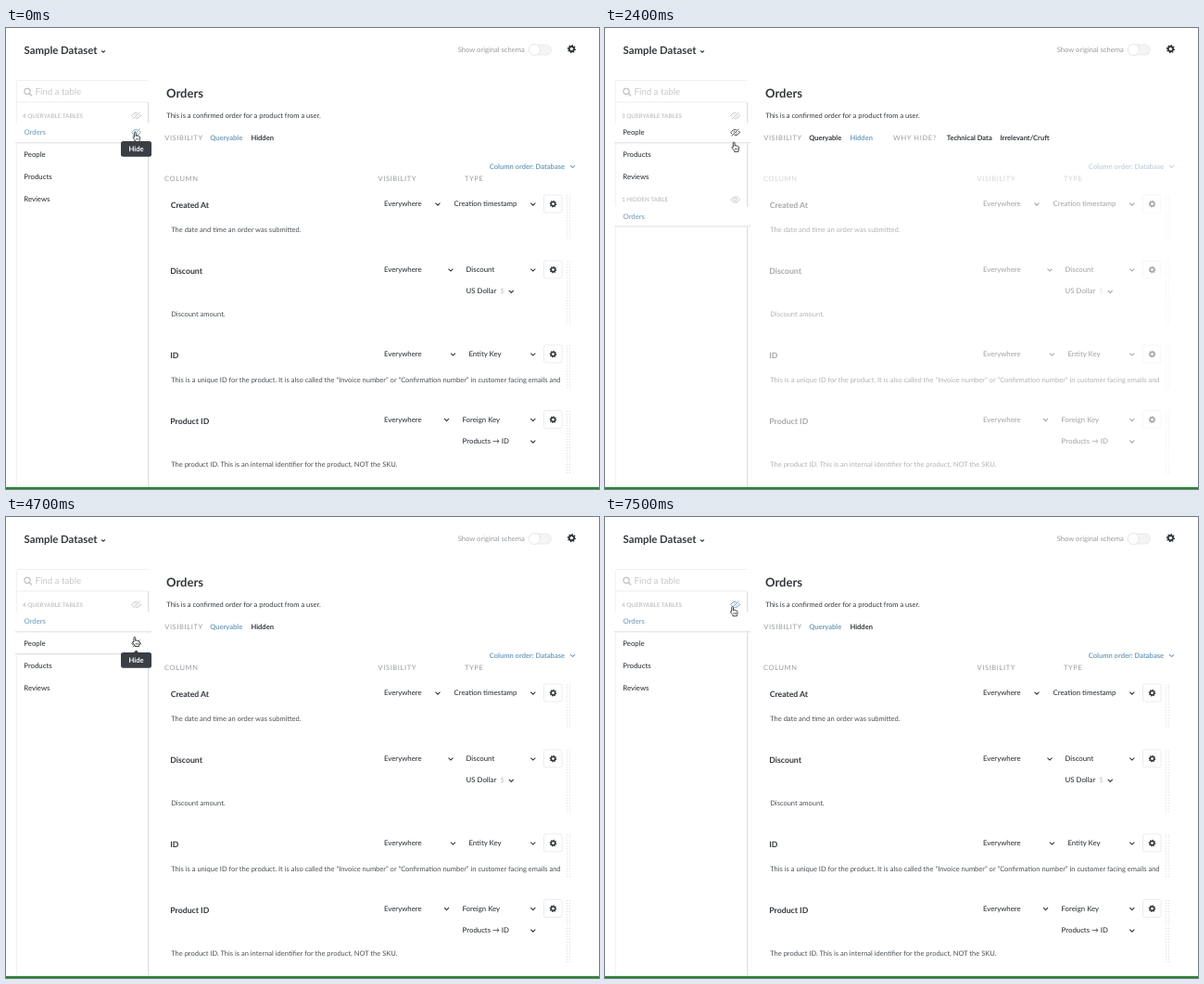
Recreate the animation shown at these times as an HTML page. Size 640 by 497 pixels, loop 8 s.

```html
<!DOCTYPE html>
<html lang="en">
<head>
<meta charset="utf-8">
<title>Table visibility</title>
<style>
html, body { margin: 0; width: 100%; height: 100%; overflow: hidden; background: #fff; }
svg { display: block; width: 640px; height: 497px; }
text { font-family: Lato, "Open Sans", sans-serif; text-rendering: geometricPrecision; white-space: pre; }
</style>
</head>
<body>
<svg id="stage" viewBox="0 0 640 497" xmlns="http://www.w3.org/2000/svg">
  <g id="base"></g>
  <g id="visibility"></g>
  <g id="columns"></g>
  <g id="sidebar"></g>
  <g id="tip"></g>
  <g id="hand"><path fill="#fff" stroke="#2b2f33" stroke-width=".9" stroke-linejoin="round"
    d="M-1.1 5.4V.9a.9.9 0 0 1 1.8 0V4q.2-.7.9-.6.8.1.8.8.3-.5.9-.3.7.1.7.9.4-.3.8 0 .4.2.4.8v1.6q0 1-.6 1.8v1.2H.2v-1q-1.4-1.4-2.4-3.1-.4-.9.2-1.1.5-.1.9.4z"/>
    <path stroke="#2b2f33" stroke-width=".6" d="M1.2 6.3v2M2.4 6.3v2M3.6 6.3v2"/></g>
</svg>
<script>
const LOOP = 8000, STEP = 100;
const INK = '#33383d', TEXT = '#4a4f54', GREY = '#979b9f', PALE = '#c3c5c7', BLUE = '#6f9fc2', DARK = '#3a3f45';
const $ = id => document.getElementById(id);

const label = (x, y, s, size, fill, weight = 400, extra = '') =>
  `<text x="${x}" y="${y}" font-size="${size}" fill="${fill}" font-weight="${weight}" ${extra}>${s}</text>`;
const caps = (x, y, s) => label(x, y, s, 7.52, GREY, 400, 'letter-spacing=".62"');
const bold = (x, y, s, fill = INK) => label(x, y, s, 7.55, fill, 700);
const pick = (x, y, s, fill = INK) => label(x, y, s, 7.8, fill, 500);
const body = (x, y, s) => label(x, y, s, 7.52, TEXT);
const line = (x1, y1, x2, y2, color, extra = '') =>
  `<path d="M${x1} ${y1}L${x2} ${y2}" stroke="${color}" ${extra}/>`;
const chevron = (x, y, color = INK, r = 2.5) =>
  `<path d="M${x - r} ${y - r / 2}l${r} ${r}l${r} ${-r}" fill="none" stroke="${color}" stroke-width="1.1"/>`;

function gear(x, y, r) {
  let d = '';
  for (let i = 0; i < 32; i++) {
    const a = (i + 0.5) * Math.PI / 16, k = i % 4 < 2 ? r : r * 0.76;
    d += `${i ? 'L' : 'M'}${(x + k * Math.sin(a)).toFixed(2)} ${(y - k * Math.cos(a)).toFixed(2)}`;
  }
  return `<path d="${d}Z" fill="${INK}"/><circle cx="${x}" cy="${y}" r="${r * 0.36}" fill="#fff"/>`;
}

function eye(y, color, slashed) {
  const slash = slashed ? line(3.6, -3.8, -3.6, 3.8, '#fff', 'stroke-width="2.4"') + line(3.8, -3.8, -3.8, 3.8, color) : '';
  return `<g transform="translate(140.6 ${y})" fill="none" stroke="${color}" stroke-width=".9">
    <path d="M-5 0Q0-6.4 5 0Q0 6.4-5 0z"/><circle r="1.5"/>${slash}</g>`;
}

const fields = [
  { y: 189.5, end: 228, name: 'Created At', nx: 177.7, type: 'Creation timestamp', tx: 483.6, chev: 466,
    note: 'The date and time an order was submitted.', ny: 220 },
  { y: 260.4, end: 320, name: 'Discount', nx: 177.3, type: 'Discount', tx: 496.5, chev: 480,
    note: 'Discount amount.', ny: 311.2 },
  { y: 351.4, end: 390, name: 'ID', nx: 177.3, type: 'Entity Key', tx: 499.4, chev: 482.5,
    note: 'This is a unique ID for the product. It is also called the “Invoice number” or “Confirmation number” in customer facing emails and', ny: 382 },
  { y: 422, end: 482, name: 'Product ID', nx: 177.3, type: 'Foreign Key', tx: 492.5, chev: 475.5,
    note: 'The product ID. This is an internal identifier for the product, NOT the SKU.', ny: 473 }
];

function drawField(f) {
  const dots = [605.5, 608.5].map(x => line(x, f.y - 9, x, f.end, '#dcdcdc', 'stroke-dasharray="1 2"')).join('');
  return label(f.nx, f.y + 4.8, f.name, 8.7, INK, 700)
    + pick(407.9, f.y + 2.6, 'Everywhere') + chevron(f.chev, f.y + 0.4)
    + pick(f.tx, f.y + 2.6, f.type) + chevron(568.8, f.y + 0.4)
    + `<rect x="580.5" y="${f.y - 9.5}" width="19.5" height="19" rx="2" fill="#fff" stroke="#ececec"/>`
    + gear(590.5, f.y + 0.2, 3.9) + dots + body(178.2, f.ny, f.note);
}

function drawBase() {
  return label(19.6, 27.6, 'Sample Dataset', 11.35, INK, 700) + chevron(105, 25.4, INK, 1.8)
    + label(487.8, 26, 'Show original schema', 7.6, GREY)
    + '<rect x="564.5" y="18" width="24" height="11" rx="5.5" fill="#f4f4f4" stroke="#ebebeb"/>'
    + '<circle cx="570.3" cy="23.5" r="6" fill="#fff" stroke="#e2e2e2" stroke-width=".8"/>'
    + gear(610.4, 22.6, 4.7)
    + line(11.5, 57, 11.5, 494, '#f1f1f1') + line(12, 56.5, 153, 56.5, '#f0f0f0') + line(12, 80, 153, 80, '#ededed')
    + line(153.5, 80, 153.5, 495, '#e0e0e0') + line(154.5, 80, 154.5, 495, '#f5f5f5')
    + '<circle cx="23" cy="68.2" r="3.1" fill="none" stroke="#bfc1c3" stroke-width="1.2"/>'
    + line(25.2, 70.4, 28, 73.2, '#bfc1c3', 'stroke-width="1.4"')
    + label(31.4, 72.3, 'Find a table', 9.75, '#c6c8ca')
    + label(173, 75, 'Orders', 13, INK, 700)
    + label(173.3, 97, 'This is a confirmed order for a product from a user.', 7.52, INK)
    + caps(171.2, 121, 'VISIBILITY')
    + '<rect y="495" width="640" height="2" fill="#1f8a24"/>';
}

function drawVisibility(hidden) {
  return bold(220.2, 121, 'Queryable', hidden ? INK : BLUE) + bold(264.4, 121, 'Hidden', hidden ? BLUE : INK)
    + (hidden ? caps(311, 121, 'WHY HIDE?') + bold(368.8, 121, 'Technical Data') + bold(426.4, 121, 'Irrelevant/Cruft') : '');
}

function drawColumns(mode) {
  const lost = mode === 'none';
  return bold(521.8, 151.6, 'Column order: Database', BLUE) + chevron(611.5, 149.3, BLUE)
    + caps(171, 164.8, 'COLUMN') + caps(401.5, 164.8, 'VISIBILITY') + caps(495, 164.8, 'TYPE')
    + fields.map(drawField).join('')
    + pick(496.6, 286.3, 'US Dollar') + label(533.6, 286.3, '$', 7.5, '#c4c6c8') + chevron(545.3, 284.2)
    + pick(492.6, 448, lost ? 'Select a target' : 'Products → ID', lost ? '#858585' : INK)
    + chevron(568.8, 445.9, lost ? '#858585' : INK);
}

// Sidebar layout for each mode: all queryable, one hidden, none queryable.
const names = ['Orders', 'People', 'Products', 'Reviews'];
const stack = (list, slashed) => list.map((name, i) => ({ name, y: 112.8 + 23.8 * i, slashed }));
const layouts = {
  all: { heads: [[94.4, '4 QUERYABLE TABLES', true]], rows: stack(names, true) },
  some: {
    heads: [[94.4, '3 QUERYABLE TABLES', true], [185, '1 HIDDEN TABLE', false]],
    rows: [...stack(names.slice(1), true), { name: 'Orders', y: 203, slashed: false }]
  },
  none: { heads: [[94.4, '4 HIDDEN TABLES', false]], rows: stack(names, false) }
};

function drawRow(r, handY) {
  const picked = r.name === 'Orders', over = Math.abs(handY - r.y) < 11;
  const plate = picked || over
    ? `<rect x="10" y="${r.y - 10.5}" width="147" height="21" fill="#fff"/>`
      + line(10, r.y + 10.9, 157, r.y + 10.9, '#e0e0e0') + line(10, r.y + 11.9, 156, r.y + 11.9, '#f6f6f6')
    : '';
  return plate + label(picked ? 19.5 : 19.3, r.y + 2.5, r.name, 7.75, picked ? BLUE : INK, 500)
    + (over ? eye(r.y - 0.2, picked ? BLUE : INK, r.slashed) : '');
}

function drawSidebar(mode, handY) {
  const { heads, rows } = layouts[mode];
  const titles = heads.map(([y, s, slashed]) => label(18, y + 2.4, s, 6.3, PALE, 700)
    + eye(y, handY > y - 6 && handY < y + 6 ? BLUE : PALE, slashed));
  return titles.join('') + rows.map(r => drawRow(r, handY)).join('');
}

// start, end, text, top, width
const tips = [
  [0, 800, 'Hide', 122, 33],
  [3200, 3400, 'Unhide', 214, 43],
  [4700, 4800, 'Hide', 146, 33],
  [5000, 5400, 'Hide all', 105, 43],
  [6500, 7200, 'Unhide all', 105, 51]
];

function drawTip(t) {
  const tip = tips.find(([from, to]) => t >= from && t < to + STEP);
  if (!tip) return '';
  const [, to, s, y, w] = tip, cx = 140.5;
  return `<g opacity="${t < to ? 1 : 0.5}"><path d="M${cx - 3} ${y + 0.5}l3-3l3 3z" fill="${DARK}"/>
    <rect x="${cx - w / 2}" y="${y}" width="${w}" height="16.7" rx="2.5" fill="${DARK}"/>`
    + label(cx, y + 11, s, 7.65, '#fff', 700, 'text-anchor="middle"') + '</g>';
}

// time, x, y
const path = [
  [0, 139.5, 112.4], [2200, 139.5, 112.4], [3100, 138.5, 197.5], [4400, 138.5, 197.5],
  [4700, 139, 129.4], [5000, 144, 92.3], [6300, 144, 92.3], [6800, 137.8, 96.6], [LOOP, 137.8, 96.6]
];

function handAt(t) {
  const i = path.findIndex(p => p[0] > t), a = path[i - 1], b = path[i];
  let u = (t - a[0]) / (b[0] - a[0]);
  if (b[0] === 3100) u = u * u * (3 - 2 * u);
  return [a[1] + (b[1] - a[1]) * u, a[2] + (b[2] - a[2]) * u];
}

const modeAt = t => t < 800 ? 'all' : t < 3400 ? 'some' : t < 5400 ? 'all' : t < 7500 ? 'none' : 'all';

let shownMode, shownStep;
function render(t) {
  if (t === shownStep) return;
  shownStep = t;
  const mode = modeAt(t), [x, y] = handAt(t);
  if (mode !== shownMode) {
    shownMode = mode;
    $('visibility').innerHTML = drawVisibility(mode !== 'all');
    $('columns').innerHTML = drawColumns(mode);
    $('columns').setAttribute('opacity', mode === 'all' ? 1 : 0.43);
  }
  $('sidebar').innerHTML = drawSidebar(mode, y);
  $('tip').innerHTML = drawTip(t);
  $('hand').setAttribute('transform', `translate(${x} ${y})`);
}

$('base').innerHTML = drawBase();
const start = performance.now();
function tick() {
  const t = (performance.now() - start) % LOOP;
  render(Math.floor(t / STEP) * STEP);
  requestAnimationFrame(tick);
}
tick();
</script>
</body>
</html>
```
